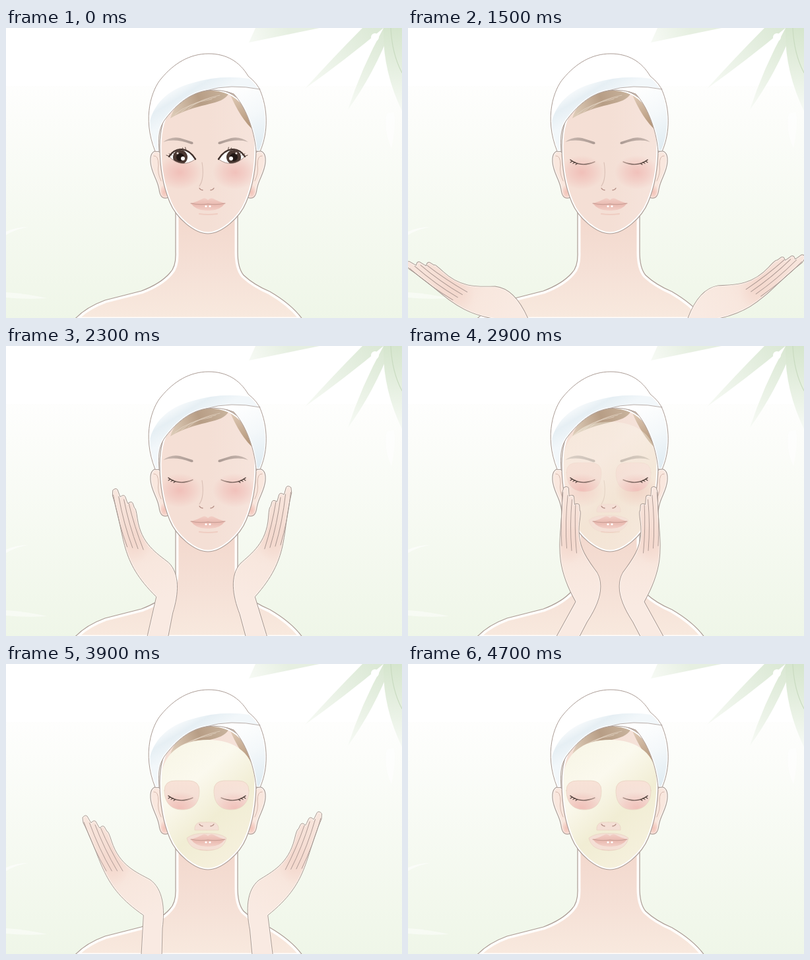
Recreate the animation shown at these times as an HTML page with a canvas. Size 600x440 px, loop 5.4 s.

```html
<!DOCTYPE html>
<html lang="en">
<head>
<meta charset="utf-8">
<title>Face mask</title>
<style>
html, body { margin: 0; width: 100%; height: 100%; overflow: hidden; background: #fff; }
canvas { display: block; width: 600px; height: 440px; }
</style>
</head>
<body>
<canvas id="stage" width="600" height="440"></canvas>
<script>
const ctx = document.getElementById('stage').getContext('2d');
const LOOP = 5400, LINE = '#ab9c95';

const shape = d => new Path2D(d);

// Joins half a shape with its mirror image about a vertical axis
function sym(half, axis) {
  const path = shape(half);
  path.addPath(shape(half), new DOMMatrix([-1, 0, 0, 1, 2 * axis, 0]));
  return path;
}

function bothSides(axis, draw) {
  draw();
  ctx.save();
  ctx.translate(2 * axis, 0);
  ctx.scale(-1, 1);
  draw();
  ctx.restore();
}

function linear(x0, y0, x1, y1, ...colors) {
  const g = ctx.createLinearGradient(x0, y0, x1, y1);
  colors.forEach((c, i) => g.addColorStop(i / (colors.length - 1), c));
  return g;
}

function fill(path, style) {
  ctx.fillStyle = style;
  ctx.fill(path);
}

function stroke(path, style, width) {
  ctx.strokeStyle = style;
  ctx.lineWidth = width;
  ctx.stroke(path);
}

function clipped(path, draw) {
  ctx.save();
  ctx.clip(path);
  draw();
  ctx.restore();
}

// Fill, pale inner rim, thin outline
function rimmed(path, style, rim) {
  fill(path, style);
  clipped(path, () => stroke(path, '#fffdfb', rim));
  stroke(path, LINE, 1.2);
}

function dot(x, y, r, color) {
  ctx.fillStyle = color;
  ctx.beginPath();
  ctx.arc(x, y, r, 0, 7);
  ctx.fill();
}

function glow(x, y, rx, ry, rgb, alpha) {
  ctx.save();
  ctx.translate(x, y);
  ctx.scale(rx, ry);
  const g = ctx.createRadialGradient(0, 0, 0, 0, 0, 1);
  g.addColorStop(0, `rgba(${rgb},${alpha})`);
  g.addColorStop(0.5, `rgba(${rgb},${alpha * 0.55})`);
  g.addColorStop(1, `rgba(${rgb},0)`);
  dot(0, 0, 1, g);
  ctx.restore();
}

const body = shape('M257 280 V340 Q258 362 248 372 Q234 388 205 399 L150 413 Q120 424 103 443 H450 Q434 420 400 400 Q376 390 360 375 Q351 364 351 340 V280');
const face = sym('M306 92 C256 92 233 130 233 180 C233 212 238 240 248 264 C258 289 286 312 306 312', 306);
const ear = shape('M236 191 C225 181 218 190 219 203 C220 220 230 230 232 245 Q234 262 246 257 L242 225Z');

const towelOuter = 'M226 187 C205 135 222 92 235 77 C254 54 278 39 307 39 C334 39 354 51 367 73 Q382 85 386 97 C399 130 395 165 385 187';
const wrapEdge = 'C376 152 362 118 345 100 Q326 92 303 95';
const bandEdge = 'C275 100 255 120 240 140 C230 155 231 170 232 187';
const towel = shape(`${towelOuter} H379 ${wrapEdge} ${bandEdge}Z`);
const band = shape(`M216 150 C222 115 245 94 280 84 Q325 70 369 77 L384 93 Q340 84 303 95 ${bandEdge} H226Z`);
const wrap = shape(`M303 95 Q340 84 385 93 C399 130 395 165 385 187 H379 ${wrapEdge}Z`);

const fringe = shape('M249 137 Q262 94 320 94 Q342 96 335 103 C322 118 290 113 249 137Z');
const sideHair = shape('M338 97 C360 102 370 130 376 156 Q355 138 338 97Z');
const brow = shape('M238 173 Q250 164 264 167 L283 173 Q285 177 280 176 Q256 167 238 173Z');

const lips = sym('M306 261 Q302 257 298 259 Q289 264 280 266 Q289 278 306 277', 306);
const mouth = sym('M306 267 Q293 269 280 266', 306);
const almond = shape('M247 195 C258 179 276 181 287 199 Q266 214 247 195Z');
const upperLid = shape('M247 195 C258 179 276 181 287 199');
const halfLid = shape('M245 199 Q266 187 287 202');
const closedLid = shape('M246 200 Q262 212 283 203');

const holes = sym('M240 192 Q240 177 257 177 H278 Q293 178 293 192 C293 211 284 221 267 221 C249 221 240 209 240 192Z ' +
  'M304 240 H294 Q285 242 286 252 H304 M304 257 Q284 256 274 264 Q278 283 304 283', 304);
const mask = sym('M306 115 C264 115 235 137 235 178 C235 212 240 238 250 264 C260 287 288 310 306 310', 306);
mask.addPath(holes);

// Hand with the outer side of the wrist at 0,0; fingertips step down one by one
function makeHand() {
  let d = 'M0 0 C-65 -45 -60 -80 -91 -140';
  for (let i = 0; i < 3; i++) {
    const x = -92 + 13 * i, y = -148 + 8 * i;
    d += `L${x} ${y} Q${x + 4} ${y - 5} ${x + 7} ${y - 2} L${x + 11} ${y + 5}`;
  }
  return shape(d + 'Q-53 -128 -48 -112 C-36 -75 -10 -65 10 -54 C30 -40 33 -10 29 20 L26 150 H-9 L-3 60Z');
}
const hand = makeHand();

// n counts the steps from the middle of the reach; 2 is touching the face
function handPose(n) {
  return n === 2
    ? { x: 254, y: 388, turn: 26, axis: 306, lift: 0 }
    : { x: 208 + 19.5 * n, y: 380 + 4 ** -n, turn: 9.7 * n, axis: 302.5, lift: 4 };
}

function drawHand(turn, x, y) {
  ctx.save();
  ctx.translate(x, y);
  ctx.rotate(turn * Math.PI / 180);
  fill(hand, linear(-85, -145, 15, 0, '#f8e6dd', '#f5dcd2', '#f8e7de', '#f9eae2'));
  clipped(hand, () => {
    glow(-44, -74, 24, 30, '240,200,187', 0.35);
    stroke(hand, 'rgba(255,250,246,.7)', 3);
  });
  for (let i = 0; i < 4; i++) {
    stroke(shape(`M${-90 + 8.5 * i} ${-141 + i * i} Q${-75 + 8 * i} -100 ${-56 + 8.3 * i} -67`), '#a99690', 0.9);
  }
  stroke(hand, '#a3938c', 0.9);
  ctx.restore();
}

function drawHands(n, drop) {
  const { x, y, turn, axis, lift } = handPose(n);
  drawHand(turn, x, y + drop);
  ctx.save();
  ctx.translate(2 * axis, 0);
  ctx.scale(-1, 1);
  drawHand(turn + lift, x, y + drop);
  ctx.restore();
}

// Blade hanging from the top edge, pale at its tip
function leaf(left, right, tipX, tipY, bow, color) {
  const midX = (left + right) / 2, y = tipY * 0.5;
  fill(shape(`M${left} 0 Q${(left + tipX) / 2 - bow} ${y} ${tipX} ${tipY} Q${(right + tipX) / 2 + bow} ${y + bow} ${right} 0Z`),
    linear(tipX, tipY, midX, 0, '#f7faf5', color));
}

function drawBackground() {
  ctx.fillStyle = '#fff';
  ctx.fillRect(0, 0, 600, 440);
  ctx.fillStyle = linear(0, 85, 0, 440, '#fefefd', '#eff6e8');
  ctx.fillRect(0, 88, 600, 352);
  leaf(378, 475, 368, 22, 0, '#e6efe1');
  leaf(540, 572, 453, 92, 2, '#dce9d6');
  leaf(572, 584, 518, 124, 7, '#d9e7d2');
  leaf(572, 640, 600, 126, 16, '#d5e5cd');
  stroke(shape('M583 0 Q585 40 600 68'), '#c9dbc0', 1.2);
  fill(shape('M577 130 Q572 155 584 182 Q591 150 588 128Z'), 'rgba(255,255,255,.6)');
  dot(559, 14, 6, '#fff');
  dot(550, 29, 3, '#fff');
  fill(shape('M0 309 Q16 302 34 302 Q17 304 0 314Z'), 'rgba(255,255,255,.6)');
  fill(shape('M0 401 Q30 403 62 410 Q28 412 0 409Z'), 'rgba(255,255,255,.5)');
}

function drawBody() {
  rimmed(body, linear(0, 290, 0, 440, '#f3d9ce', '#f5e0d6', '#f8e9de'), 9);
  bothSides(306, () => {
    rimmed(ear, '#f9e7de', 3);
    clipped(ear, () => glow(240, 249, 8, 12, '238,170,158', 0.6));
    stroke(shape('M224 194 Q231 193 231 208 Q229 220 235 232'), '#d5b8ad', 1);
  });
}

function drawEyeball() {
  fill(almond, '#fff');
  clipped(almond, () => {
    dot(264, 196, 11, '#4a3832');
    dot(264, 196, 6, '#211714');
    dot(268, 198, 3, '#fff');
    dot(260, 190, 1.6, '#e9dfdb');
  });
}

function drawOpenEye() {
  drawEyeball();
  stroke(almond, '#927870', 0.8);
  stroke(upperLid, '#41312c', 2.4);
  for (let i = 0; i < 8; i++) {
    const x = 248 + i * 3.5, y = 195 - 10 * Math.sin(i / 5);
    stroke(shape(`M${x} ${y} l${-5 + i * 0.6} ${-2 - i * 0.3}`), '#594740', 1);
  }
}

function drawHalfEye() {
  clipped(shape('M240 215 L245 199 Q266 187 287 202 L292 215Z'), drawEyeball);
  stroke(halfLid, '#514039', 1.8);
}

function drawClosedEye() {
  stroke(closedLid, linear(246, 0, 283, 0, '#43342f', '#6a5650', '#b59a91'), 1.4);
  for (let i = 0; i < 3; i++) {
    stroke(shape(`M${249 + 4 * i} ${202 + 1.6 * i} l-3 2`), '#51413b', 1.1);
  }
}

function drawFace(time) {
  fill(face, linear(235, 0, 378, 0, '#f5dfd5', '#f4dfd5', '#f6e4dc'));
  const eye = time < 500 ? drawOpenEye : time < 1000 ? drawHalfEye : drawClosedEye;
  clipped(face, () => bothSides(305, () => glow(263, 219, 34, 26, '236,160,156', 0.5)));
  bothSides(302.5, () => fill(brow, linear(238, 0, 284, 0, '#c9b8b0', '#ab9a93')));
  bothSides(304.5, eye);

  stroke(shape('M297 204 Q301 228 293 240'), '#d9bfb5', 1.1);
  bothSides(304, () => stroke(shape('M293 243 Q295 246 298 246'), '#b08a80', 1.3));

  fill(lips, linear(0, 258, 0, 278, '#f2d0c7', '#e9b9b0', '#f4d2c9'));
  stroke(mouth, '#c59c93', 1.1);
  bothSides(306, () => dot(303, 270.5, 1.6, '#fff'));
  stroke(shape('M293 282 Q306 284 320 282'), '#efcdc2', 2.2);

  fill(fringe, linear(252, 130, 338, 100, '#dccab6', '#b79d85', '#c9b49e'));
  for (let i = 0; i < 3; i++) {
    stroke(shape(`M${256 + 10 * i} ${131 - 4 * i} Q${276 + 8 * i} ${114 - 3 * i} ${312 + 6 * i} ${108 - 3 * i}`), 'rgba(240,228,214,.5)', 1);
  }
  fill(sideHair, linear(345, 100, 376, 150, '#dfcab6', '#b09174'));
}

function drawMask(alpha) {
  ctx.globalAlpha = alpha;
  ctx.fillStyle = linear(245, 130, 365, 270, '#f8f6e7', '#fbf9ee', '#f1edd4', '#f5f0dc');
  ctx.fill(mask, 'evenodd');
  fill(holes, linear(0, 177, 0, 200, '#f8e2d7', 'rgba(248,226,215,0)'));
  stroke(holes, '#e9d3c2', 0.8);
  ctx.globalAlpha = 1;
}

function drawTowel() {
  clipped(face, () => stroke(face, '#fff', 5));
  stroke(face, LINE, 1.2);
  fill(towel, '#fff');
  fill(band, linear(250, 86, 274, 126, '#fff', '#e6eff4', '#f2f7fa'));
  fill(wrap, linear(345, 90, 386, 180, '#fff', '#f4f8fa', '#e1ecf2'));
  clipped(towel, () => stroke(towel, 'rgba(255,255,255,.8)', 4));
  stroke(shape('M303 95 Q340 84 385 93'), '#b8aeaa', 1);
  stroke(towel, LINE, 1);
}

function render(time) {
  const step = Math.floor((time - 1500) / 200);
  const alpha = Math.max(0, Math.min(1, (step - 5) / 5));
  drawBackground();
  drawBody();
  drawFace(time);
  if (alpha) drawMask(alpha);
  drawTowel();
  if (step >= 0 && step <= 15) {
    // In, pat the cheeks twice, and out the same way
    const n = Math.min(step, 15 - step, 5) - 3;
    const patting = step === 6 || step === 8;
    drawHands(n, patting ? 8 : 0);
  }
}

ctx.lineCap = ctx.lineJoin = 'round';
const start = performance.now();
function tick() {
  render((performance.now() - start) % LOOP);
  requestAnimationFrame(tick);
}
tick();
</script>
</body>
</html>
```
